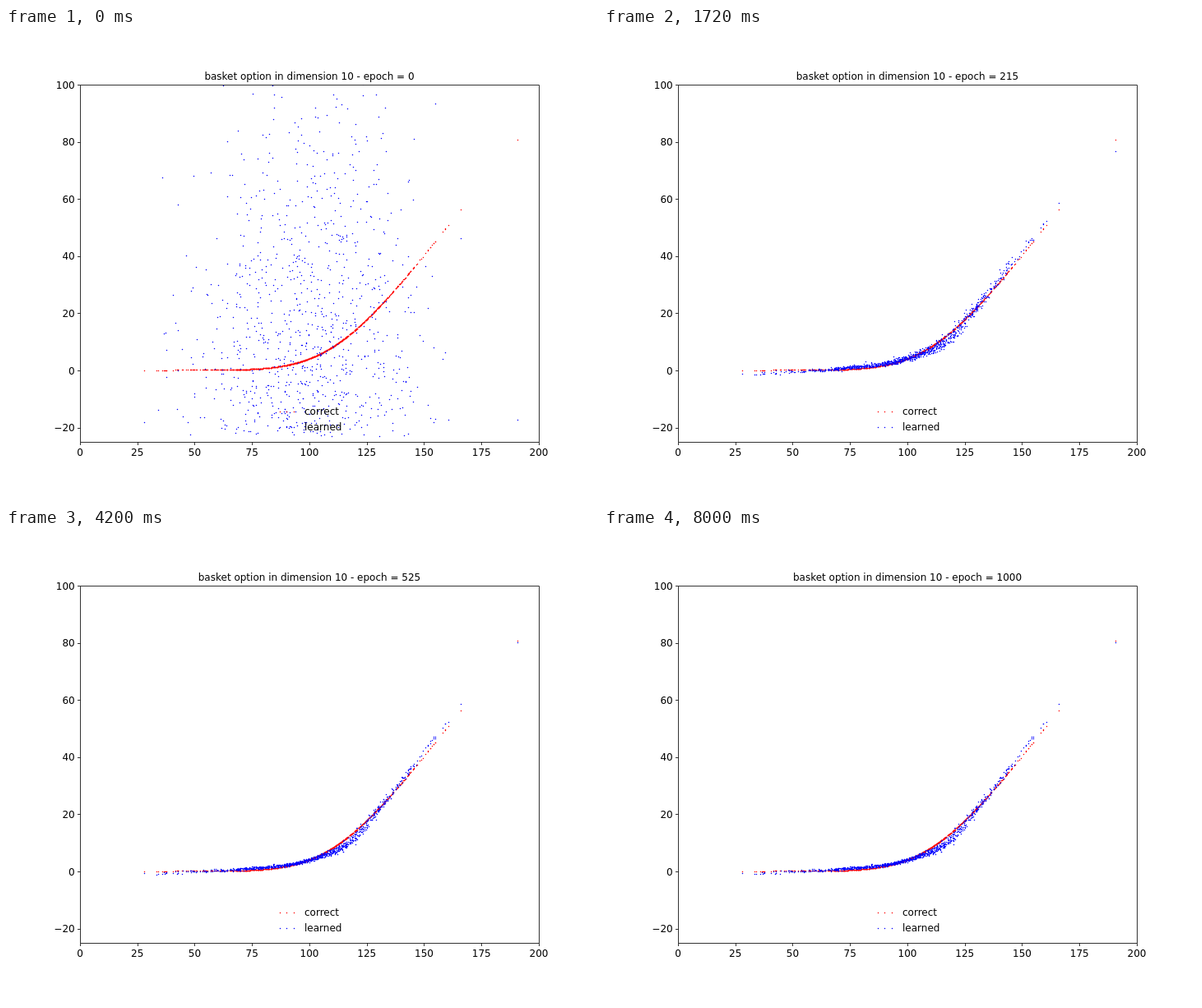
Recreate the animation shown at these times as an HTML page with a canvas. Size 720 px wide and 576 px high, loop 8040 ms.

```html
<!DOCTYPE html>
<html lang="en">
<head>
<meta charset="utf-8">
<title>Basket option training</title>
<style>
  html, body { margin: 0; width: 100%; height: 100%; overflow: hidden; background: #fff; }
  canvas, svg { position: absolute; left: 0; top: 0; width: 720px; height: 576px; }
  text { font: 12px "DejaVu Sans", sans-serif; fill: #000; }
  path { fill: none; stroke: #000; stroke-width: .8; }
  .mid { text-anchor: middle; }
  .end { text-anchor: end; }
</style>
</head>
<body>
<canvas id="plot" width="720" height="576"></canvas>
<svg id="axes" viewBox="0 0 720 576">
  <path d="M90.5 69.5H648.5V504.5H90.5Z"/>
  <text id="title" class="mid" x="369" y="63"></text>
  <text x="363" y="471">correct</text>
  <text x="363" y="490">learned</text>
</svg>
<script>
const STEP = 40, FRAMES = 201, COUNT = 1000;
const RED = '#f00', BLUE = '#00f';
const ctx = document.getElementById('plot').getContext('2d');
const axes = document.getElementById('axes');
const title = document.getElementById('title');

const px = x => 90 + x * 2.79;
const py = y => 417.02 - y * 3.479;

function add(tag, attrs, text = '') {
  const el = document.createElementNS('http://www.w3.org/2000/svg', tag);
  for (const key in attrs) el.setAttribute(key, attrs[key]);
  el.textContent = text;
  axes.append(el);
}

for (let v = 0; v <= 200; v += 25) {
  const x = Math.round(px(v) - .01) + .5;
  add('path', { d: `M${x} 504.5v3.5` });
  add('text', { class: 'mid', x: px(v), y: 521 }, v);
}
for (let v = -20; v <= 100; v += 20) {
  const y = Math.round(py(v)) + .5;
  add('path', { d: `M90.5 ${y}h-3.5` });
  add('text', { class: 'end', x: 83.7, y: py(v) + 4.5 }, String(v).replace('-', '\u2212'));
}

// Seeded random numbers
let seed = 20517;
function rand() {
  seed = (seed + 0x6D2B79F5) | 0;
  let r = Math.imul(seed ^ (seed >>> 15), 1 | seed);
  r ^= r + Math.imul(r ^ (r >>> 7), 61 | r);
  return ((r ^ (r >>> 14)) >>> 0) / 4294967296;
}
const gauss = () => Math.sqrt(-2 * Math.log(1 - rand())) * Math.cos(2 * Math.PI * rand());
const skewed = k => (Math.exp(k * gauss()) - 1) / k;
const weibull = (scale, shape) => scale * Math.pow(-Math.log(1 - rand()), 1 / shape);

const bump = (x, mid, width) => Math.exp(-(((x - mid) / width) ** 2));
const rise = (x, mid, width) => 1 / (1 + Math.exp((mid - x) / width));

// Normal-model call price with strike 110 and deviation 20
function price(x) {
  const d = (x - 110) / 20;
  const density = Math.exp(-d * d / 2) / Math.sqrt(2 * Math.PI);
  const below = 1 / (1 + Math.exp(-1.5976 * d - .07056 * d ** 3));
  return 20 * (d * below + density);
}

// Error of the trained network, and the extra error it has at epoch 55
const lateBias = x => .7 * bump(x, 80, 16) + 2 * bump(x, 156, 18)
  - .9 * bump(x, 28, 18) - 2 * bump(x, 117, 11);
const lateSpread = x => .25 + .8 * bump(x, 128, 20);
const earlyBias = x => 8.5 * rise(x, 80, 16) - 4.9 - (Math.max(0, x - 125) / 11) ** 2;
const earlySpread = x => .7 + 8 * rise(x, 104, 16);

// Isolated outermost points
const points = [
  { x: 190.7, start: -17.4, slow: -32.5, late: 80.2 },
  { x: 166.2, start: 46, slow: 2, late: 58.4 },
  { x: 28.3, start: -18.2, slow: -4.8, late: -.8 }
];
while (points.length < COUNT) {
  const x = 100 + 26 * gauss();
  if (x < 31 || x > 163) continue;
  points.push({
    x,
    start: weibull(54, 1.2) - 24,
    slow: earlyBias(x) + earlySpread(x) * skewed(.35),
    late: price(x) + lateBias(x) + lateSpread(x) * gauss()
  });
}

// Markers sit on whole pixels
function dot(x, y) {
  ctx.beginPath();
  ctx.arc(Math.floor(x) + .5, Math.floor(y) + .5, .75, 0, 7);
  ctx.fill();
}

function scatter(color, value) {
  ctx.fillStyle = color;
  for (const p of points) dot(px(p.x), py(value(p)));
}

function legendRow(color, y) {
  ctx.fillStyle = color;
  for (let i = 0; i < 3; i++) dot(333.4 + i * 8.5, y);
}

function draw(frame) {
  const epoch = frame * 5;
  const fast = Math.exp(-epoch / 14), slow = Math.exp((55 - epoch) / 72);
  title.textContent = `basket option in dimension 10 - epoch = ${epoch}`;
  ctx.clearRect(0, 0, 720, 576);
  ctx.save();
  ctx.beginPath();
  ctx.rect(90, 69, 558, 435);
  ctx.clip();
  scatter(RED, p => price(p.x));
  scatter(BLUE, p => fast * p.start + (1 - fast) * (p.late + slow * p.slow));
  legendRow(RED, 467);
  legendRow(BLUE, 486);
  ctx.restore();
}

let shown = -1;
function tick() {
  const frame = Math.floor(performance.now() / STEP) % FRAMES;
  if (frame !== shown) draw(shown = frame);
  requestAnimationFrame(tick);
}
tick();
</script>
</body>
</html>
```
